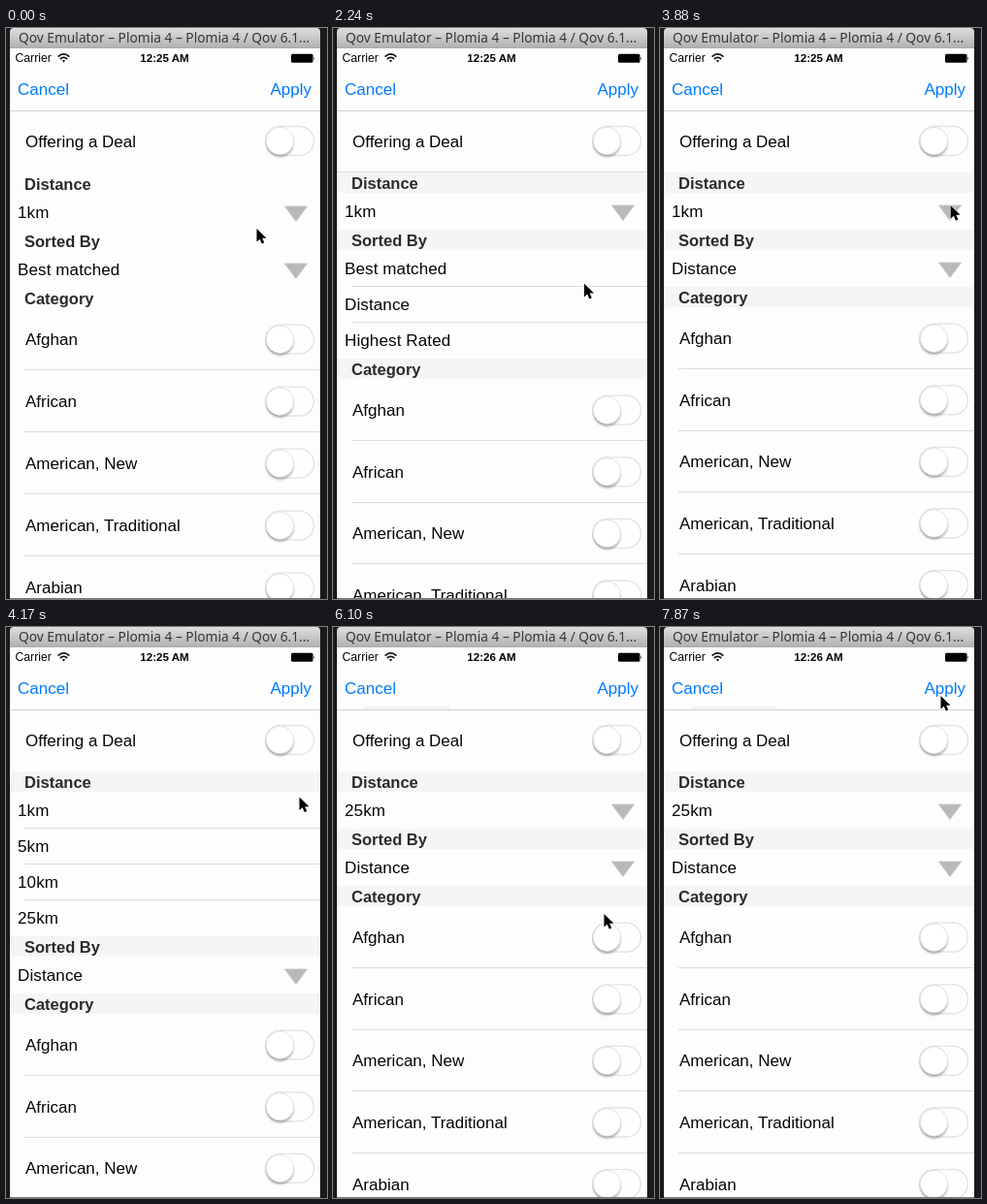
Write an HTML page that moves like this. It is 331 px wide and 589 px high and loops after 8000 ms.

```html
<!DOCTYPE html>
<html lang="en">
<head>
<meta charset="utf-8">
<title>Filter screen</title>
<style>
html, body { margin: 0; width: 100%; height: 100%; overflow: hidden; background: #1a1a1a; }
svg { display: block; width: 100%; height: 100%; }
text { font: 17px "Liberation Sans", Arial, sans-serif; fill: #050505; white-space: pre; }
.head { font-weight: bold; font-size: 16.5px; fill: #2b2b2b; }
.option { letter-spacing: .12px; }
.line { stroke: #dcdcdc; shape-rendering: crispEdges; }
.link { fill: #007aff; }
.title { font: 13.75px "Noto Sans", "Open Sans", sans-serif; fill: #363636; }
.carrier { font-size: 12.2px; }
.clock { font-size: 11.6px; font-weight: bold; text-anchor: middle; }
</style>
</head>
<body>
<svg viewBox="0 0 331 589">
  <defs>
    <linearGradient id="bar" x2="0" y2="1">
      <stop stop-color="#dedede"/><stop offset="1" stop-color="#b2b2b2"/>
    </linearGradient>
    <clipPath id="list"><path d="M4 86H324V588H4Z"/></clipPath>
    <filter id="soft" x="-30%" y="-30%" width="160%" height="170%">
      <feGaussianBlur stdDeviation="1.3"/>
    </filter>
    <g id="switch">
      <rect x="267.5" y="-15" width="50" height="30" rx="15" fill="#fefefe" stroke="#e2e2e2" stroke-width="1.3"/>
      <circle cx="282.5" cy="2.7" r="14" fill="#000" opacity=".29" filter="url(#soft)"/>
      <circle cx="282.5" r="14.2" fill="#fff" stroke="#dadada" stroke-width=".8"/>
    </g>
    <path id="arrow" d="M287.5 -6H310.5L299 9.5Z" fill="#b9b9b9" stroke="#c8c8c8"/>
  </defs>
  <rect width="331" height="589" fill="#1a1a1a"/>
  <path d="M4 20V4Q4 0 8 0H320Q324 0 324 4V20Z" fill="url(#bar)"/>
  <path d="M4 20H324V588H4Z" fill="#fdfdfd"/>
  <path d="M4 20.5H324" stroke="#777" opacity=".6"/>
  <path d="M4 588.5H324" stroke="#777"/>
  <text class="title" x="13" y="15.3">Qov Emulator – Plomia 4 – Plomia 4 / Qov 6.1...</text>
  <text class="carrier" x="9.5" y="35.4">Carrier</text>
  <g fill="none" stroke="#111" stroke-width="1.7">
    <path d="M53.6 29.6Q59.5 24.2 65.4 29.6M55.8 32Q59.5 28.6 63.2 32"/>
    <path d="M59.5 35.6L57.8 33.6Q59.5 32.2 61.2 33.6Z" fill="#111" stroke="none"/>
  </g>
  <text class="clock" id="clock" x="163.5" y="35.3"></text>
  <rect x="294" y="26.7" width="22.5" height="9" rx="1.5"/>
  <path d="M317.2 29.5Q319 31.3 317.2 33.2Z" fill="#222"/>
  <path id="strip" d="M32 81.5H120V85H32Z" fill="#f3f3f3"/>
  <text class="link" x="12" y="69.2">Cancel</text>
  <text class="link" x="315" y="69.2" text-anchor="end">Apply</text>
  <path d="M4 85.5H324" stroke="#d2d2d2"/>
  <g clip-path="url(#list)">
    <text x="20" y="123">Offering a Deal</text>
    <use href="#switch" y="116.5"/>
    <g id="body"></g>
    <path id="edge" class="line" d="M4 148.5H324"/>
  </g>
  <path id="cursor" d="M0 0V13.6L3.2 10.7L5.3 15.6L7.8 14.5L5.7 9.7H10Z" fill="#000" stroke="#fff" stroke-width="1.1" paint-order="stroke"/>
</svg>
<script>
const LOOP = 8000, ROW = 37;
const $ = id => document.getElementById(id);
const body = $("body");

function add(parent, tag, attrs, label = "") {
  const el = document.createElementNS("http://www.w3.org/2000/svg", tag);
  for (const k in attrs) el.setAttribute(k, attrs[k]);
  el.textContent = label;
  return parent.appendChild(el);
}

function makeHeader(label) {
  const g = add(body, "g", {});
  const band = add(g, "rect", { x: 4, width: 320, height: 21, fill: "#f5f5f5" });
  add(g, "text", { x: 19, y: 17, class: "head" }, label);
  return { g, band };
}

const line = (g, y) => add(g, "path", { d: `M19 ${y}H324`, class: "line" });
const option = (g, y, name) => add(g, "text", { x: 12, y, class: "option" }, name);

// A section whose first row opens into a list of options
function makePicker(title, options) {
  const { g, band } = makeHeader(title);
  const label = option(g, 46, options[0]);
  const arrow = add(g, "use", { href: "#arrow", y: 40 });
  const rest = add(g, "g", {});
  options.slice(1).forEach((name, i) => {
    line(rest, 58.5 + i * ROW);
    option(rest, 46 + (i + 1) * ROW, name);
  });
  return { g, band, label, arrow, rest, extra: (options.length - 1) * ROW };
}

const dist = makePicker("Distance", ["1km", "5km", "10km", "25km"]);
const sort = makePicker("Sorted By", ["Best matched", "Distance", "Highest Rated"]);
const cat = makeHeader("Category");
const foods = ["Afghan", "African", "American, New", "American, Traditional", "Arabian"].map(name => {
  const g = add(cat.g, "g", {});
  add(g, "text", { x: 20, y: 6 }, name);
  add(g, "use", { href: "#switch" });
  line(g, 31.3);
  return g;
});

const clamp = v => Math.max(0, Math.min(1, v));
const place = (el, x, y) => el.setAttribute("transform", `translate(${x} ${y})`);
const fade = (el, v) => el.setAttribute("opacity", v);

// Share of n evenly spaced changes done at time t
function steps(t, from, to, n) {
  if (t < from) return 0;
  return Math.min(n, Math.floor((t - from) / (to - from) * (n - 1) + 1.001)) / n;
}

function setPicker(p, open, y) {
  place(p.g, 0, y);
  fade(p.rest, open);
  fade(p.arrow, 1 - open);
  return y + 59 + open * p.extra;
}

function cursorAt(a, b, c, d, e, done, f) {
  const moves = [
    [clamp(a * 4 / 3), 260.5, 238.5],
    [b * b, 258.5, 273],
    [c, 259.5, 289],
    [clamp(d * 1.4), 302.5, 175.5],
    [e, 302, 297],
    [done, 279.5, 296],
    [f, 289.5, 71]
  ];
  let x = 258.5, y = 207;
  for (const [p, tx, ty] of moves) {
    x += (tx - x) * p;
    y += (ty - y) * p;
  }
  return [x + 8 * Math.sin(Math.PI * f), y];
}

function draw(t) {
  const a = steps(t, 150, 600, 4);
  const b = steps(t, 1490, 2390, 7);
  const c = steps(t, 2540, 3140, 5);
  const d = steps(t, 3440, 4170, 6);
  const e = steps(t, 4770, 5650, 7);
  const done = t >= 6100 ? 1 : 0;
  const f = steps(t, 6990, 7870, 7);

  const loose = a < .75;
  const sortOpen = clamp(a * 2 - 1) * (1 - clamp(c * 5 / 3));
  const distOpen = done ? 0 : clamp(d * 3 - 2);
  const pitch = loose ? 64 : 63.6;

  let y = loose ? 150 : 149;
  y = setPicker(dist, distOpen, y);
  y = setPicker(sort, sortOpen, y);
  place(cat.g, 0, y);
  foods.forEach((g, i) => place(g, 0, 53.2 + i * pitch));
  for (const s of [dist, sort, cat]) fade(s.band, loose ? 0 : 1);
  fade($("edge"), sortOpen);

  dist.label.textContent = done ? "25km" : "1km";
  sort.label.textContent = c > 0 ? "Distance" : "Best matched";
  $("clock").textContent = e > .5 ? "12:26 AM" : "12:25 AM";
  fade($("strip"), done);
  place($("cursor"), ...cursorAt(a, b, c, d, e, done, f));
}

const start = performance.now();
function tick() {
  draw((performance.now() - start) % LOOP);
  requestAnimationFrame(tick);
}
tick();
</script>
</body>
</html>
```
